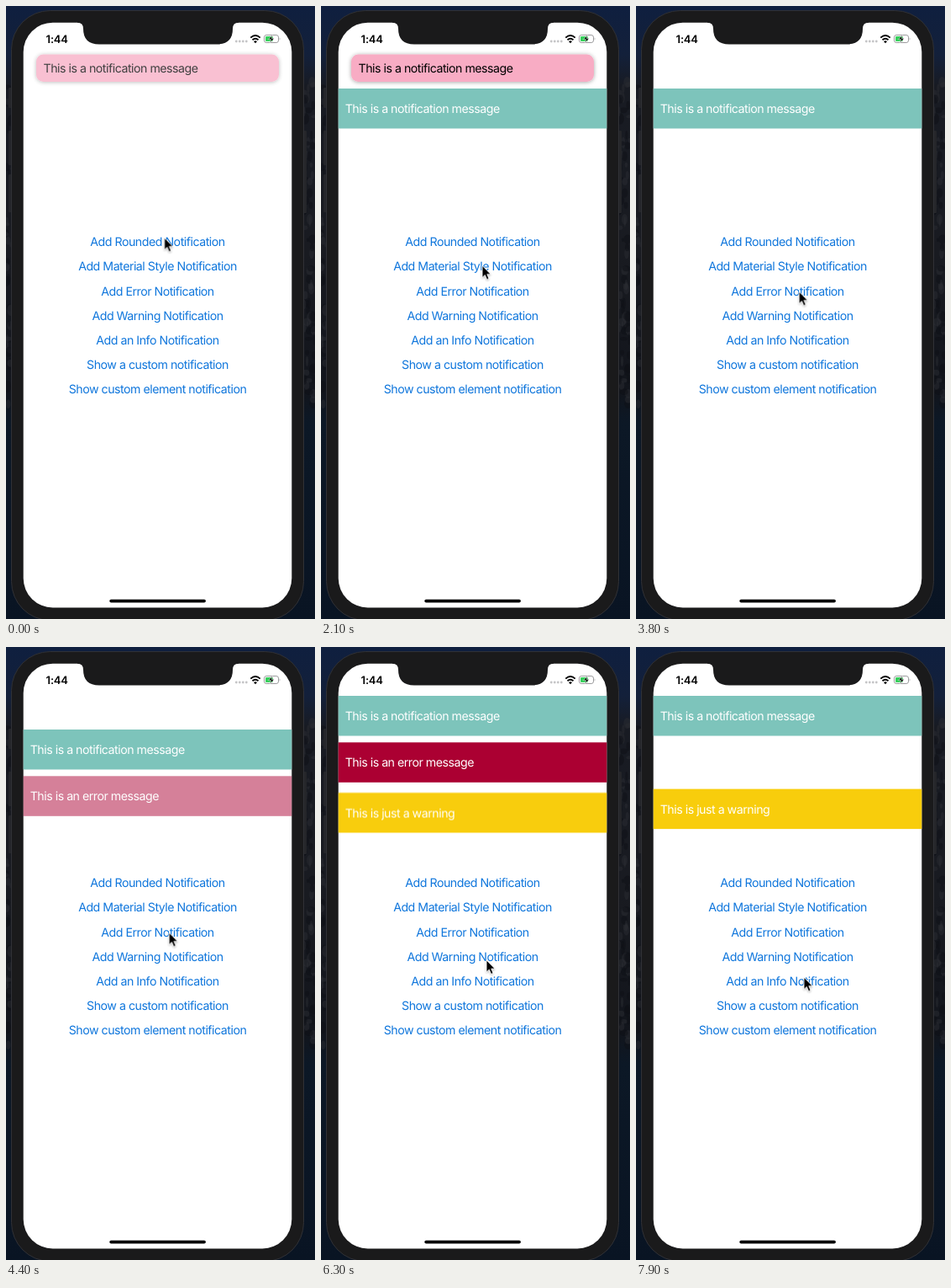
An HTML page that plays this animation: 368x728 px, repeating every 8000 ms.

```html
<!DOCTYPE html>
<html lang="en">
<head>
<meta charset="utf-8">
<title>Notification demo</title>
<style>
  html, body { margin: 0; width: 100%; height: 100%; overflow: hidden; background: #0b1626; }
  svg { display: block; width: 368px; height: 728px; }
  text {
    font: 14.2px Inter, "Open Sans", sans-serif;
    letter-spacing: -0.49px;
    text-rendering: geometricPrecision;
  }
  .link { fill: #0f76dc; text-anchor: middle; }
  .clock { font-size: 13px; font-weight: 600; letter-spacing: -0.2px; text-anchor: middle; }
  .bar text { fill: #fff; }
</style>
</head>
<body>
<svg viewBox="0 0 368 728">
  <defs>
    <linearGradient id="sky" x2="0" y2="1">
      <stop offset="0" stop-color="#0f1f3f"/>
      <stop offset=".08" stop-color="#13203a"/>
      <stop offset=".13" stop-color="#181b23"/>
      <stop offset=".4" stop-color="#191b21"/>
      <stop offset=".63" stop-color="#12151c"/>
      <stop offset=".68" stop-color="#0c1826"/>
      <stop offset="1" stop-color="#091423"/>
    </linearGradient>
    <filter id="soft" x="-10%" y="-40%" width="120%" height="180%">
      <feDropShadow dx="0" dy=".6" stdDeviation="2.4" flood-opacity=".36"/>
    </filter>
    <filter id="lift" x="-50%" y="-50%" width="200%" height="200%">
      <feDropShadow dx="0" dy="1" stdDeviation="1" flood-opacity=".3"/>
    </filter>
  </defs>

  <rect width="368" height="728" fill="url(#sky)"/>
  <g id="rocks"></g>

  <!-- phone -->
  <g fill="#25262a">
    <rect x="3" y="97" width="4" height="24" rx="1"/>
    <rect x="3" y="148" width="4" height="41" rx="1"/>
    <rect x="3" y="200" width="4" height="45" rx="1"/>
    <rect x="354" y="148" width="4" height="98" rx="1"/>
  </g>
  <rect x="6.5" y="5.5" width="348" height="724" rx="46" fill="#1a1a1b" stroke="#303136"/>
  <rect x="20.7" y="19.7" width="319.6" height="694.8" rx="35" fill="#fff"/>
  <path d="M85 19H277V19.7Q270 19.7 270 27Q270 45.5 251 45.5H111Q92 45.5 92 27Q92 19.7 85 19.7Z" fill="#1a1a1b"/>

  <!-- status bar -->
  <text class="clock" x="60.7" y="43.8">1:44</text>
  <g fill="#c4c4c6">
    <circle cx="274.3" cy="42" r="1.4"/><circle cx="278.3" cy="42" r="1.4"/>
    <circle cx="282.3" cy="42" r="1.4"/><circle cx="286.3" cy="42" r="1.4"/>
  </g>
  <g fill="none" stroke="#000" stroke-width="1.9">
    <path d="M291.3 37.6Q297 32.4 302.7 37.6"/>
    <path d="M293.5 40.2Q297 37.2 300.5 40.2"/>
  </g>
  <path d="M295 42.1Q297 40.5 299 42.1L297 44.2Z"/>
  <rect x="307.5" y="34.5" width="17" height="9" rx="2.6" fill="#fff" stroke="#9b9b9d"/>
  <rect x="309" y="36" width="9" height="6" rx="1.3" fill="#35cf5a"/>
  <path d="M325.7 37.3Q327.3 39 325.7 40.7Z" fill="#9b9b9d"/>
  <path d="M317.3 34.6L312.7 39.7H315.6L314.6 43.6L319.3 38.4H316.3Z" stroke="#fff" stroke-width=".5"/>

  <!-- notifications -->
  <g id="pink">
    <rect x="36" y="57.5" width="289" height="32.5" rx="8.5" fill="#f8acc4" filter="url(#soft)"/>
    <text x="44.5" y="79">This is a notification message</text>
  </g>
  <g id="stack"></g>

  <g id="links"></g>
  <rect x="123.3" y="704.7" width="114.6" height="3.8" rx="1.9"/>

  <g id="cursor">
    <path d="M0 0V14.3L3.3 11.3L5.6 16.6L8.1 15.5L5.8 10.3H10.2Z" stroke="#fff" stroke-width=".9"
      stroke-linejoin="round" filter="url(#lift)"/>
  </g>
</svg>

<script>
const LOOP = 8000;
const $ = id => document.getElementById(id);

function add(parent, tag, attrs, text) {
  const el = document.createElementNS("http://www.w3.org/2000/svg", tag);
  for (const key in attrs) el.setAttribute(key, attrs[key]);
  if (text) el.textContent = text;
  parent.append(el);
  return el;
}

// steps: [time, value, easing towards the next step]
function run(el, prop, steps) {
  const last = steps.length - 1;
  const all = [[0, steps[0][1]], ...steps, [LOOP, steps[last][1]]];
  el.animate(
    all.map(([time, value, easing = "linear"]) => ({ offset: time / LOOP, [prop]: value, easing })),
    { duration: LOOP, iterations: Infinity }
  );
}

const shift = (x, y) => `translate(${x}px, ${y}px)`;

// rough cliffs along both edges of the wallpaper
let seed = 7;
const random = () => (seed = seed * 16807 % 2147483647) / 2147483647;
for (let i = 0; i < 110; i++) {
  const x = random() < 0.35 ? random() * 6 : 354 + random() * 14;
  add($("rocks"), "ellipse", {
    cx: x, cy: 85 + random() * 390, rx: 1 + random() * 4, ry: 2 + random() * 5,
    fill: random() < 0.5 ? "#0e1016" : "#2a2b31", opacity: 0.5
  });
}

function addBar(parent, y, color, message) {
  const bar = add(parent, "g", { class: "bar" });
  add(bar, "rect", { x: 20.7, y, width: 319.6, height: 47.5, fill: color });
  add(bar, "text", { x: 28.7, y: y + 29 }, message);
  return bar;
}

const labels = [
  "Add Rounded Notification", "Add Material Style Notification", "Add Error Notification",
  "Add Warning Notification", "Add an Info Notification",
  "Show a custom notification", "Show custom element notification"
];
const links = labels.map((label, i) =>
  add($("links"), "text", { class: "link", x: 180.5, y: 285.2 + i * 29.15 }, label));

function press(link, down, up) {
  run(link, "opacity", [[down, 1], [down + 120, 0.2], [up, 0.2], [up + 250, 1]]);
}
press(links[1], 1090, 1330);
press(links[2], 3930, 4130);
press(links[3], 5440, 5650);

const stack = $("stack");
const teal = addBar(stack, 98, "#7dc4bb", "This is a notification message");
const error = addBar(stack, 153.3, "#ab0032", "This is an error message");
const warning = addBar(stack.parentNode, 168.6, "#f8cd0c", "This is just a warning");
stack.after(warning);

run($("pink"), "opacity", [[0, 0.75], [180, 1], [2600, 1], [3350, 0]]);
run(teal, "opacity", [[1330, 0, "ease-out"], [2130, 1]]);
run(error, "opacity", [[4130, 0, "ease-out"], [4930, 1], [7150, 1], [7800, 0]]);
run(warning, "opacity", [[5700, 0, "ease-out"], [6340, 1]]);
run(stack, "transform", [[5700, shift(0, 0), "ease-out"], [6100, shift(0, -40)]]);
run(warning, "transform", [[5700, shift(0, 40), "ease-out"], [6530, shift(0, 0)]]);

run($("cursor"), "transform", [
  [750, shift(188.6, 275.3), "ease-in-out"], [1050, shift(192, 308.3)],
  [2130, shift(192, 308.3), "ease-in-out"], [2350, shift(194.2, 339.3)],
  [4850, shift(194.2, 339.3), "ease-in-out"], [5150, shift(197, 371.8)],
  [6550, shift(197, 371.8), "ease-in-out"], [6900, shift(200, 392.3)]
]);
</script>
</body>
</html>
```
